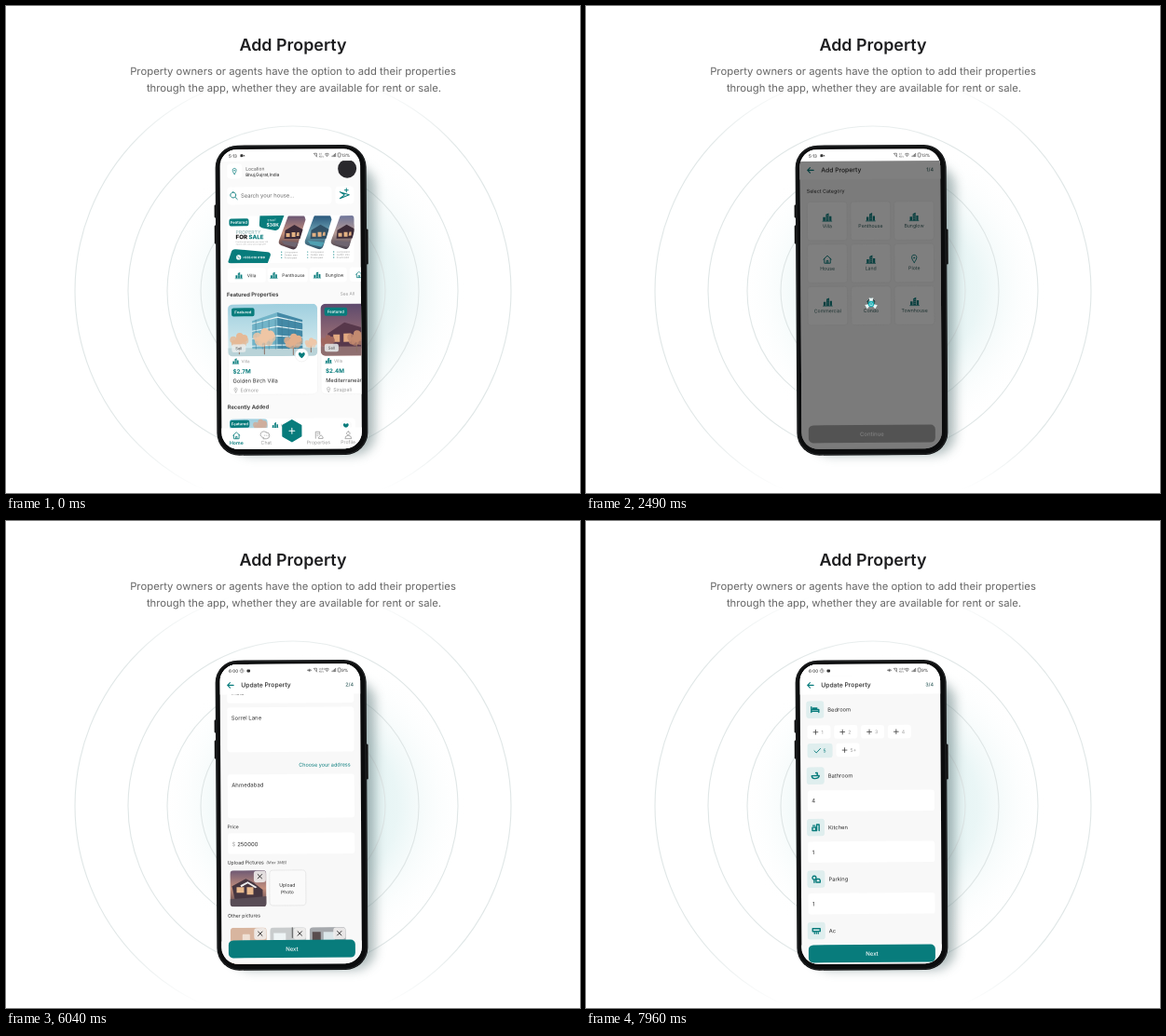
Recreate the animation shown at these times as an HTML page. Size 616 by 523 pixels, loop 8 s.

```html
<!DOCTYPE html>
<html lang="en">
<head>
<meta charset="utf-8">
<title>Add Property</title>
<style>
html, body { margin: 0; width: 100%; height: 100%; overflow: hidden; background: #fff; }
svg { display: block; width: 100%; height: 100%; font-family: Inter, "Open Sans", sans-serif; text-rendering: geometricPrecision; }
</style>
</head>
<body>
<svg id="stage" viewBox="0 0 616 523"></svg>
<script>
const TEAL = '#087c7c', INK = '#2b2b2b', GREY = '#9a9a9a', PAGE = '#f8f8f8', MINT = '#dfeeee';
const LOOP = 8000;

// Drawing helpers
const rect = (x, y, w, h, r, fill, more = '') =>
  `<rect x="${x}" y="${y}" width="${w}" height="${h}" rx="${r}" fill="${fill}" ${more}/>`;
const dot = (x, y, r, fill, more = '') => `<circle cx="${x}" cy="${y}" r="${r}" fill="${fill}" ${more}/>`;
const text = (x, y, size, str, fill = INK, more = '') =>
  `<text x="${x}" y="${y}" font-size="${size}" fill="${fill}" ${more}>${str}</text>`;
const line = (d, color = TEAL, w = 0.8, more = '') =>
  `<path d="${d}" fill="none" stroke="${color}" stroke-width="${w}" stroke-linecap="round" stroke-linejoin="round" ${more}/>`;
const shape = (d, fill, more = '') => `<path d="${d}" fill="${fill}" ${more}/>`;
const group = (id, body, more = '') => `<g id="${id}" ${more}>${body}</g>`;
const at = (x, y, body, k = 1) => `<g transform="translate(${x} ${y}) scale(${k})">${body}</g>`;
const MID = 'text-anchor="middle"', END = 'text-anchor="end"';
const weight = w => `font-weight="${w}"`;

let clips = 0;
function clipped(x, y, w, h, r, body) {
  const id = 'clip' + clips++;
  return `<clipPath id="${id}">${rect(x, y, w, h, r, '#000')}</clipPath><g clip-path="url(#${id})">${body}</g>`;
}
const vertical = (id, ...colors) => `<linearGradient id="${id}" x2="0" y2="1">` +
  colors.map((c, i) => `<stop offset="${i / (colors.length - 1)}" stop-color="${c}"/>`).join('') + '</linearGradient>';

// Icons, centred on 0,0
const pin = (x, y, c = TEAL, k = 1) => at(x, y,
  line('M0 3.2C-3-.3-2.4-3 0-3S3-.3 0 3.2Z', c, 0.7) + dot(0, -0.6, 0.7, c), k);
const towers = (x, y, k = 1, c = TEAL) => at(x, y,
  shape('M-4 3.8V0h2.2v3.8ZM-1.2 3.8V-2.8L1.6-4v7.8ZM2.2 3.8V-1H4.2v4.8Z', c) +
  line('M-4.4 4H4.5M-.4-1.5h1.2M-.4.3h1.2M-.4 2h1.2', MINT, 0.45) + line('M-4.4 4H4.5', c, 0.6), k);
const home = (x, y, c, k = 1) => at(x, y, line('M-3.6-.2 0-3.6 3.6-.2M-2.8-.8V3.4H2.8V-.8M-.7 3.2V1H.7V3.2', c, 0.8), k);
const heart = (x, y, k = 1) => at(x, y, shape('M0 3.2C-5 0-3.6-3.2-1.6-2.8-.6-2.6 0-1.6 0-1.6S.6-2.6 1.6-2.8C3.6-3.2 5 0 0 3.2Z', TEAL), k);
const cross = (x, y, r, c, w = 0.9) => line(`M${x - r} ${y - r}l${2 * r} ${2 * r}m0 ${-2 * r}l${-2 * r} ${2 * r}`, c, w);
const plus = (x, y, r, c, w = 0.8) => line(`M${x - r} ${y}h${2 * r}M${x} ${y - r}v${2 * r}`, c, w);
const badge = (x, y, w = 24.5, h = 9) => rect(x, y, w, h, 2, TEAL) +
  text(x + w / 2, y + h / 2 + 1.5, 4.2, 'Featured', '#fff', MID + weight(600));

function status(id, clock, late) {
  const x = late ? 326.5 : 330.5;
  let s = rect(228, 150, 156, 16.5, 0, '#fff') + text(240, 162.4, 4.5, clock, INK, weight(500));
  if (late) s += line('M254 158.6a2 2 0 1 0 .1 0ZM254 159.6v1.2h.8', '#444', 0.5) + rect(259.4, 159.3, 3.6, 2.8, 0.8, '#333') +
    line('M324.6 160.4q2-2.4 4 0q-2 2.4-4 0', '#444', 0.6) + dot(x, 160.4, 0.7, '#444');
  else s += rect(252.4, 159, 3, 2.8, 0.6, '#333') + shape('M255.6 160.4l1.5-1v2Z', '#333');
  s += line('M331.4 158.6l3 3.6M332 158.4h2.4v3', '#444', 0.6) +
    text(336.6, 160, 2.6, late ? 'Vo5G' : '0.1', '#444') + text(336.6, 162.6, 2.4, 'KB/s', '#444') +
    line('M343.4 159.2q2-1.6 4 0M344.3 160.5q1.1-.9 2.2 0M345.4 161.6v.1', '#444', 0.7) +
    line('M351 162v-.6m1.2.6v-1.5m1.2 1.5v-2.4m1.2 2.4v-3.4', '#444', 0.7) +
    rect(357.2, 158.2, 2.8, 4.2, 0.6, 'none', 'stroke="#444" stroke-width=".6"') +
    text(361, 162.4, 4.5, late ? '9%' : '13%', INK);
  return group(id, s);
}

const backArrow = line('M245 176h-6.4m2.7-2.7-2.7 2.7 2.7 2.7', TEAL, 1.1);
const header = (title, step) => rect(228, 166, 156, 20, 0, '#fff') + backArrow +
  text(253, 178.2, 6.8, title, INK, weight(500)) + text(374, 177.8, 5.4, step, '#35605f', END + weight(500));
const button = (y, label, fill = TEAL) => rect(238, y, 136, 19, 5, fill) + text(306, y + 11.8, 6, label, '#fff', MID + weight(500));
const field = (y, h, str = '', drop = 13.4) => rect(238, y, 136, h, 3, '#fff') + text(242.4, y + drop, 6, str, INK);

// Home page
function banner() {
  let s = rect(238, 225, 136, 51, 4, '#fff');
  s += shape('M273 225h26l-5 13q-1.5 3.5-5 2.8l-13-2.6q-4-1-3.6-4Z', TEAL) +
    text(281, 231, 3, 'START', '#fff') + text(280, 236.6, 5, '$38K', '#fff', weight(700));
  s += text(247, 244.4, 5.1, 'PROPERTY', '#7fa9a9') + text(247, 250, 6.2, 'FOR <tspan fill="#087c7c">SALE</tspan>', '#111', weight(800)) +
    text(247, 253.7, 1.9, 'Find the right place for your family and', GREY) + text(247, 256.2, 1.9, 'move in with a clear and simple plan', GREY);
  s += shape('M238 276l4-12q1-3.6 5-3.2l34 3.2q4 .6 3 4l-3 8Z', TEAL) + dot(250, 269.6, 2.6, '#fff') +
    line('M249 268.5q.2 1.8 2 2.2', TEAL, 0.7) + text(254.4, 271, 3.3, '+555 010 0199', '#fff', weight(700));
  for (let i = 0; i < 3; i++) {
    const x = 293 + 28 * i;
    s += shape(`M${x + 11} 226.5h16l1 3-9 28q-1.6 4-5 2.5l-11-4q-2.6-1-1.6-4Z`, `url(#dusk${i})`,
      `stroke="url(#dusk${i})" stroke-width="2" stroke-linejoin="round"`) +
      shape(`M${x + 7} 241l10-6 9 5-3 10h-17Z`, i === 1 ? '#315166' : '#3c2b38') +
      shape(`M${x + 8} 244h4v4h-4Zm6-1h4v5h-4Zm6 0h2v4h-3Z`, '#e3b183') + shape(`M${x + 3} 252l18 2-3 5-12-3Z`, i === 1 ? '#4fa0b2' : '#6f6570');
    for (let j = 0; j < 3; j++) s += dot(x + 3, 264.2 + 3 * j, 0.7, '#4aa5a5') + text(x + 6, 265.2 + 3 * j, 2.4, ['Living space', 'Garden area', 'Private pool'][j], GREY);
  }
  return clipped(238, 225, 136, 51, 4, s) + badge(240, 228, 21, 8);
}

function tree(x, y, r, color) {
  let s = line(`M${x} ${y}v${r * 1.6}`, '#8b6f63', 1);
  for (let i = 0; i < 7; i++) s += dot(x + Math.cos(i * 2.4) * r * 0.7, y + Math.sin(i * 2.4) * r * 0.5, r * 0.42, color, `opacity="${0.7 + (i % 3) * 0.15}"`);
  return s + dot(x, y, r * 0.5, color);
}

function glassHouse() {
  let s = rect(238, 320, 96, 56, 0, 'url(#sky)') + rect(238, 367, 96, 9, 0, '#b9d3d8');
  s += shape('M264 338l27-9v39h-27Z', '#72b4c8') + shape('M291 329l27 8v31h-27Z', '#4389a6');
  for (let i = 0; i < 4; i++) s += line(`M264 ${341 + 8 * i}l27 ${-7 + 2 * i} 27 ${6 - 2 * i}`, '#e5f3f5', 1.1);
  for (let i = 0; i < 7; i++) s += line(`M${268 + 7 * i} 337v31`, '#3f7690', 0.5);
  return s + tree(250, 359, 9, '#e6b996') + tree(277, 356, 11, '#efc6a5') + tree(308, 360, 9, '#e2b08d') + tree(327, 362, 6, '#eec7a9');
}

function listing(x, picture, price, name, place) {
  return rect(x, 320, 96, 97, 5, '#fff', 'stroke="#eee" stroke-width=".5"') + clipped(x, 320, 96, 56, 5, picture) +
    badge(x + 4, 324) + rect(x + 4, 363, 15, 8.5, 2, '#e9eeee', 'opacity=".85"') + text(x + 11.5, 369, 4.2, 'Sell', '#444', MID) +
    dot(x + 79, 375, 7, '#fff', 'stroke="#e7e7e7" stroke-width=".5"') + heart(x + 79, 375) +
    towers(x + 8, 381, 0.75) + text(x + 14, 383, 4.6, 'Villa', GREY) + text(x + 5, 394.3, 6.2, price, TEAL, weight(700)) +
    text(x + 5, 404.3, 5.8, name) + pin(x + 8, 412, GREY, 0.8) + text(x + 13, 414.2, 5.3, place, GREY);
}

function homePage() {
  let s = rect(228, 150, 156, 330, 0, '#fafafa');
  s += rect(238, 169, 16, 16, 4, '#fff') + pin(246, 177) + text(258, 176.4, 5, 'Location', '#555') + text(258, 182.6, 4.6, 'Bhuj,Gujrat,India', INK, weight(500)) +
    dot(367, 175, 10, '#29282c');
  s += rect(238, 194, 112, 19, 4, '#fff') + line('M244.4 199.6a3 3 0 1 0 .1 0ZM246.7 205l2.2 2.2', TEAL, 0.9) + text(252.6, 205.4, 5.9, 'Search your house...', '#666') +
    rect(354, 194, 20, 19, 4, '#fff') + line('M359 200l10 3.2-10 3.8 5-3.8ZM364 198h4M366 196v4', TEAL, 1);
  s += group('banners', banner() + clipped(389, 225, 136, 51, 4, rect(389, 225, 136, 51, 4, '#fff') +
    shape('M389 225h26l-7 20q-1 4-5 4h-14Z', TEAL)) + badge(391, 228, 21, 8));
  [[238, 41, 250, 'Villa'], [281, 43, 287.5, 'Penthouse'], [326, 40, 334, 'Bunglow']].forEach(([x, w, ix, name]) => {
    s += rect(x, 281, w, 15.5, 3, '#fff') + towers(ix, 289, 0.85) + text(ix + 9, 291, 4.8, name);
  });
  s += rect(369, 281, 40, 15.5, 3, '#fff') + home(379, 289, TEAL, 0.9);
  s += text(237, 311.6, 5.8, 'Featured Properties', INK, weight(600)) + text(374, 311, 4.7, 'See All', GREY, END);
  s += listing(238, glassHouse(), '$2.7M', 'Golden Birch Villa', 'Edmore');
  const villa = rect(337, 320, 96, 56, 0, 'url(#evening)') + shape('M345 352l18-12 26 8v20h-44Z', '#57384b') +
    shape('M351 353h7v8h-7Zm11-1h8v9h-8Z', '#e2a981') + rect(337, 366, 96, 10, 0, '#8f6f70') + tree(345, 360, 7, '#a0675e') + tree(376, 357, 9, '#c38b70');
  s += listing(337.6, villa, '$2.4M', 'Mediterranean', 'Sirajpali');
  s += text(237, 432.4, 5.8, 'Recently Added', INK, weight(600)) + rect(238, 443, 136, 40, 4, '#fff') +
    clipped(239, 443, 41, 40, 4, rect(239, 443, 41, 40, 0, 'url(#sky)') + tree(272, 450, 7, '#cfae9d')) + badge(239.5, 444.5, 21, 8) +
    towers(288, 450, 0.75) + text(294, 452, 4.5, 'Villa', GREY) + dot(364, 451, 5.5, '#fff', 'stroke="#eee" stroke-width=".5"') + heart(364, 451, 0.85);
  s += rect(228, 453, 156, 26, 0, '#fff') + home(246.4, 461, TEAL) +
    line('M278.4 457.6a3.6 3.4 0 1 0-2.6 5.8l-.8 1.2h3.4a3.5 3.5 0 0 0 0-7M276.4 461h.1m1.8 0h.1m1.8 0h.1', GREY, 0.8) +
    line('M331.4 464.4v-7h4.4v3M333 459.4h1.4m-1.4 2h1M335 463l2.2-2 2 2v1.6h-4.2Z', GREY, 0.8) +
    line('M366.4 457.4a1.8 1.8 0 1 0 .1 0ZM363 464.6q0-3 3.4-3t3.4 3Z', GREY, 0.8);
  [[246.4, 'Home', TEAL], [278.4, 'Chat', GREY], [334.4, 'Properties', GREY], [366.2, 'Profile', GREY]]
    .forEach(([x, name, c]) => s += text(x, 470.6, 5.2, name, c, MID + (c === TEAL ? weight(600) : '')));
  s += group('rent', pill(272, 424, 69, 16.5, 'For Rent', 302)) + group('sell', pill(282, 404.5, 49, 16.5, 'For Sell', 302));
  return s + shape('M306 445l9.6 5.6v11.2L306 467.4l-9.6-5.6v-11.2Z', TEAL, `stroke="${TEAL}" stroke-width="2" stroke-linejoin="round"`) +
    group('plus', plus(306, 456.2, 3, '#fff', 1));
}
const pill = (x, y, w, h, label, tx) => rect(x, y + 1, w, h, 6, '#9db5b5', 'opacity=".5"') + rect(x, y, w, h, 6, TEAL) +
  home(tx - 7, y + 8, '#fff', 0.85) + line(`M${tx - 11} ${y + 12}h8`, '#fff', 0.6) + text(tx, y + 10.2, 5.4, label, '#fff');

// Category page
function categoryPage(title, label, chosen) {
  let s = rect(228, 150, 156, 330, 0, '#f7f7f7') + header(title, '1/4') + text(237.4, 200.4, 5.4, 'Select Category');
  ['Villa', 'Penthouse', 'Bunglow', 'House', 'Land', 'Plote', 'Commercial', 'Condo', 'Townhouse'].forEach((name, i) => {
    const x = 238 + 46.6 * (i % 3), y = 210 + 45.5 * Math.floor(i / 3), on = chosen && name === 'Condo';
    s += rect(x, y, 42.6, 41.5, 3, on ? MINT : '#fff', `stroke="${on ? TEAL : '#ededed'}" stroke-width=".6"`);
    s += i % 4 === 3 ? home(x + 21.3, y + 16.5, TEAL, 1.15) : i === 5 ? pin(x + 21.3, y + 16, TEAL, 1.3) : towers(x + 21.3, y + 16.5, 1.1);
    s += text(x + 21.3, y + 28, 5.2, name, '#35605f', MID);
  });
  return s + button(450, label, chosen ? TEAL : '#a8a8a8');
}

// Details page
function picture(x, y, kind) {
  const [wall, floor, item] = [['#d9a583', '#6c5a5c', '#463640'], ['#d8b59f', '#b98772', '#e9ded5'], ['#c9cccd', '#89898b', '#e8e6e4'], ['#a6a9ad', '#8a6658', '#594d4e']][kind];
  let s = rect(x, y, 39, 39, 0, wall) + rect(x, y + 26, 39, 13, 0, floor);
  if (!kind) s = rect(x, y, 39, 39, 0, 'url(#dusk0)') + shape(`M${x + 2} ${y + 17}l15-8 8 4 10 8v10h-30Z`, item) +
    shape(`M${x + 7} ${y + 18}h8v6h-8Zm11 0h7v8h-7Z`, '#e8b98d') + shape(`M${x} ${y + 31}l39-3v11h-39Z`, '#594d56') + shape(`M${x + 11} ${y + 16}l8-4 10 6-2 1-8-5-7 4Z`, '#eee');
  else if (kind === 1) s += rect(x + 13, y + 7, 8, 8, 1, '#efe0d4') + shape(`M${x + 3} ${y + 23}q12-7 31-1l3 9q-18 6-34 2Z`, item) + rect(x + 6, y + 19, 11, 6, 2, '#f6efe9');
  else if (kind === 2) s += rect(x + 4, y + 6, 13, 15, 0, '#eef4f5') + line(`M${x + 24} ${y}v11`, '#555', 1) + rect(x + 3, y + 22, 30, 8, 3, item) + rect(x + 13, y + 29, 14, 4, 1, '#4e4b4c');
  else s += rect(x + 3, y + 5, 9, 24, 0, item) + rect(x + 15, y + 5, 12, 14, 0, '#dbe6e9') + rect(x + 12, y + 22, 23, 2.5, 0, '#4a3532') + line(`M${x + 14} ${y + 24}v10m19-10v10M${x + 22} ${y + 20}v13`, '#4a3532', 1.6);
  return clipped(x, y, 39, 39, 4, s) + rect(x + 25.5, y + 0.5, 13, 12.5, 3, '#f2f0ee', 'opacity=".88"') + cross(x + 32, y + 6.6, 2.2, '#222', 0.9);
}

function detailsPage(id, title, full) {
  const val = str => full ? str : '';
  let s = text(237.4, 200.4, 5.1, 'Property name') + field(208, 23, val('Fern corner')) +
    text(237.4, 243, 5.1, 'Description') + field(251, 64, val('Outstanding location')) +
    text(237.4, 331, 5.1, 'Address') + pin(318, 328.4, '#b5b5b5', 0.9) + text(322, 330.6, 5.5, 'Choose Location', TEAL);
  ['Delhi', 'Delhi', 'India'].forEach((v, i) => s += field(342 + 27.5 * i, 22.5, val(v)));
  s += field(424, 48, val('Sorrel Lane')) + text(370, 488, 5.5, 'Choose your address', TEAL, END) + field(496, 47, val('Ahmedabad')) +
    text(237.4, 554, 5.1, 'Price') + field(559, 22.5, '<tspan fill="#aaa">$</tspan> ' + val('250000'), 14) +
    text(237.4, 592.4, 5.2, 'Upload Pictures') + text(279, 592.2, 4.2, '(Max 3MB)', '#555', 'font-style="italic"') +
    picture(240, 599, 0) + rect(282.4, 599, 39, 38, 4, '#fafafa', 'stroke="#e0e0e0" stroke-width=".7"') +
    text(301.4, 616.8, 5.1, 'Upload', INK, MID) + text(301.4, 624.4, 5.1, 'Photo', INK, MID) +
    text(237.4, 649.4, 5.2, 'Other pictures') + picture(240, 660.5, 1) + picture(282.5, 660.5, 2) + picture(325, 660.5, 3) +
    rect(240, 704.5, 39, 38, 4, '#fafafa', 'stroke="#e4e4e4" stroke-width=".7"') + text(259.5, 722, 5.1, 'Upload', INK, MID) + text(259.5, 729.6, 5.1, 'Photo', INK, MID);
  return rect(228, 150, 156, 330, 0, PAGE) + group(id, s) + header(title, '2/4') +
    rect(228, 451, 156, 28, 0, PAGE) + button(450, 'Next');
}

// Rooms page
function roomsPage() {
  const glyphs = ['M-4 3V-3M-4 1.6H4V3M-4-.2H4V1.4M-2.4-1.6h4.4', 'M-4 0H4Q4 3-1 3-4 3-4 0M2 0V-3H.4', 'M-3.6 3.4V0H0v3.4ZM1 3.4V-3h2.6v6.4M-3-2h2', 'M-2-3.4a2 2 0 1 0 .1 0ZM-2 1V3.6M0 3.4V1L1 0h2.6l.8 1.6v1.8Z', 'M-4-2.4H4V.6H-4ZM-2 2v1m2-1v1m2-1v1'];
  const room = (y, i, name) => rect(237, y, 19, 18.5, 3, MINT) + at(246.5, y + 9.2, line(glyphs[i], TEAL, 1.4)) + text(260, y + 11.4, 5.8, name);
  const chip = (x, y, n) => rect(x, y, 25, 14.5, 3, '#fff') + plus(x + 9, y + 7.4, 2.4, '#333', 0.75) + text(x + 15, y + 9.4, 5.2, n, GREY);
  let s = room(193, 0, 'Bedroom');
  for (let i = 0; i < 4; i++) s += chip(238 + 28.8 * i, 219, i + 1);
  s += rect(238, 238.5, 27, 15.5, 3, MINT) + line('M245.4 246.4l2.2 2.2 4.4-4.6', TEAL, 0.9) + text(255, 248.2, 5.2, '5', TEAL) + chip(269, 238.5, '5+');
  s += room(264, 1, 'Bathroom') + field(289, 22.5, '4', 13) + room(319.5, 2, 'Kitchen') + field(344, 22.5, '1', 13.6) +
    room(375, 3, 'Parking') + field(399.5, 22.5, '1', 13.6) + room(430.5, 4, 'Ac');
  return rect(228, 150, 156, 330, 0, PAGE) + group('roomList', s) + header('Update Property', '3/4') +
    rect(228, 455, 156, 25, 0, PAGE) + button(455, 'Next');
}

// Stage
const defs = vertical('sky', '#9fcfdf', '#dceef0') + vertical('evening', '#5d4a6d', '#b57d77') +
  vertical('dusk0', '#6f5a74', '#c48f7c', '#4b3a45') + vertical('dusk1', '#2f5d80', '#6ea5b5', '#31566b') + vertical('dusk2', '#73789a', '#b59a94', '#4d4550') +
  `<linearGradient id="ring" gradientUnits="userSpaceOnUse" x1="0" y1="80" x2="0" y2="520">
    <stop offset="0" stop-color="#dfe6e6" stop-opacity="0"/><stop offset=".16" stop-color="#dfe6e6"/>
    <stop offset=".85" stop-color="#dfe6e6"/><stop offset="1" stop-color="#dfe6e6" stop-opacity="0"/></linearGradient>
  <radialGradient id="glow"><stop offset="0" stop-color="#d9eeee"/><stop offset=".55" stop-color="#eaf6f6"/><stop offset="1" stop-color="#fff" stop-opacity="0"/></radialGradient>
  <filter id="soft" x="-30%" y="-20%" width="160%" height="140%"><feGaussianBlur stdDeviation="6"/></filter>`;

const rings = [234, 177, 135, 99].map(r => dot(308, 306, r, 'none', 'stroke="url(#ring)" stroke-width="1.1"')).join('');
const loader = group('loader', [0, 120, 240].map(a =>
  `<g transform="rotate(${a})">${shape('M-2.4-6.4h4.8l-1 3.6h-2.8Z', '#e8f3f3')}</g>`).join('') + dot(0, 0, 3.2, '#19aeb4') + line('M-1.2 1.2V-.4L0-1.6 1.2-.4V1.2Z', '#fff', 0.6));

const screen = group('home', homePage()) + group('pick', categoryPage('Add Property', 'Continue', false)) +
  group('dim', rect(228, 150, 156, 330, 0, '#000', 'opacity=".5"') + loader) +
  group('picked', categoryPage('Add Property', 'Continue', true)) + group('blank', detailsPage('blankList', 'Add Property', false)) +
  group('again', categoryPage('Update Property', 'Next', true)) + group('details', detailsPage('detailList', 'Update Property', true)) +
  group('rooms', roomsPage()) + status('early', '5:13', false) + status('late', '6:00', true) +
  group('touch', dot(0, 0, 4, '#fff', 'opacity=".75" stroke="#bbb" stroke-width=".4"'));

const stage = document.getElementById('stage');
stage.innerHTML = `<defs>${defs}</defs>` + rect(0, 0, 616, 523, 0, '#fff') +
  dot(330, 306, 165, 'url(#glow)') + rings +
  text(308, 48, 17.9, 'Add Property', '#1d1d1f', MID + weight(600)) +
  text(308, 74.4, 11.3, 'Property owners or agents have the option to add their properties', '#666', MID) +
  text(309, 92, 11.3, 'through the app, whether they are available for rent or sale.', '#666', MID) +
  rect(242, 172, 154, 310, 22, '#5d7778', 'opacity=".5" filter="url(#soft)"') +
  `<g transform="rotate(-.35 307 316)">` +
  rect(387, 240, 2, 38, 1, '#111') + rect(224.2, 213, 2, 14, 1, '#111') + rect(224.2, 235, 2, 20, 1, '#111') +
  rect(225.5, 149.3, 162, 333, 24, '#0b0c0d') + rect(226.6, 150.4, 159.8, 330.8, 23, 'none', 'stroke="#34383a" stroke-width=".6"') +
  clipped(230.5, 153.8, 150.5, 321.7, 18, screen) + '</g>';

const el = {};
stage.querySelectorAll('[id]').forEach(n => el[n.id] = n);

// Motion
const inOut = u => u < 0.5 ? 4 * u ** 3 : 1 - 4 * (1 - u) ** 3;
const out = (u, p = 3) => 1 - (1 - u) ** p;
const fade = (id, a) => { el[id].setAttribute('opacity', a); el[id].setAttribute('display', a > 0 ? 'inline' : 'none'); };
const move = (id, x, y) => el[id].setAttribute('transform', `translate(${x} ${y})`);
const zoom = (id, x, y, k) => el[id].setAttribute('transform', `translate(${x} ${y}) scale(${k}) translate(${-x} ${-y})`);

// start, end, from x, y, to x, y
const touches = [
  [450, 720, 306, 456, 306, 456], [1000, 1440, 304, 418, 304, 410], [2150, 2310, 306, 321, 306, 321],
  [2980, 3140, 306, 460, 306, 460], [4340, 4440, 306, 460, 306, 460], [4990, 5270, 248, 402, 248, 360],
  [6735, 6950, 248, 377, 248, 330], [7130, 7270, 306, 460, 306, 460]
];

function draw(t) {
  const k = (a, b) => Math.min(1, Math.max(0, (t - a) / (b - a)));
  move('banners', -151 * inOut(k(1140, 1820)), 0);
  el.plus.setAttribute('transform', `rotate(${45 * out(k(560, 800))} 306 456.2)`);
  const rent = out(k(600, 900)), sell = out(k(760, 1110));
  fade('rent', rent); zoom('rent', 306, 432, rent);
  fade('sell', sell); zoom('sell', 306, 412.5, sell);

  fade('home', t < 2160 ? 1 : 0);
  fade('pick', t >= 1440 && t < 3300 ? 1 : 0);
  move('pick', 156 * (1 - out(k(1440, 1980))), 0);
  fade('dim', t < 2590 ? k(2270, 2400) : 0);
  el.loader.setAttribute('transform', `translate(306 320) rotate(${(t - 2490) * 0.5})`);
  fade('picked', t < 3600 ? k(2530, 2580) : 0);
  fade('blank', t < 3600 ? k(3020, 3300) : 0);
  fade('again', t < 4520 ? k(3400, 3590) : 0);
  fade('details', t < 7600 ? k(4390, 4500) : 0);
  move('detailList', 0, -259 * out(k(5100, 6740), 2.35) - 50 * out(k(6745, 7180)));
  fade('rooms', t >= 7180 ? 1 : 0);
  move('rooms', 156 * (1 - out(k(7180, 7580))), 0);
  move('roomList', 0, 10 * (1 - out(k(7760, 7950), 2)));
  fade('late', k(3400, 3590));

  const tap = touches.find(p => t >= p[0] && t < p[1]);
  fade('touch', tap ? 1 : 0);
  if (tap) {
    const [a, b, x1, y1, x2, y2] = tap, u = k(a, b);
    move('touch', x1 + (x2 - x1) * u, y1 + (y2 - y1) * u);
  }
}

const start = performance.now();
function tick() {
  draw((performance.now() - start) % LOOP);
  requestAnimationFrame(tick);
}
draw(0);
requestAnimationFrame(tick);
</script>
</body>
</html>
```
